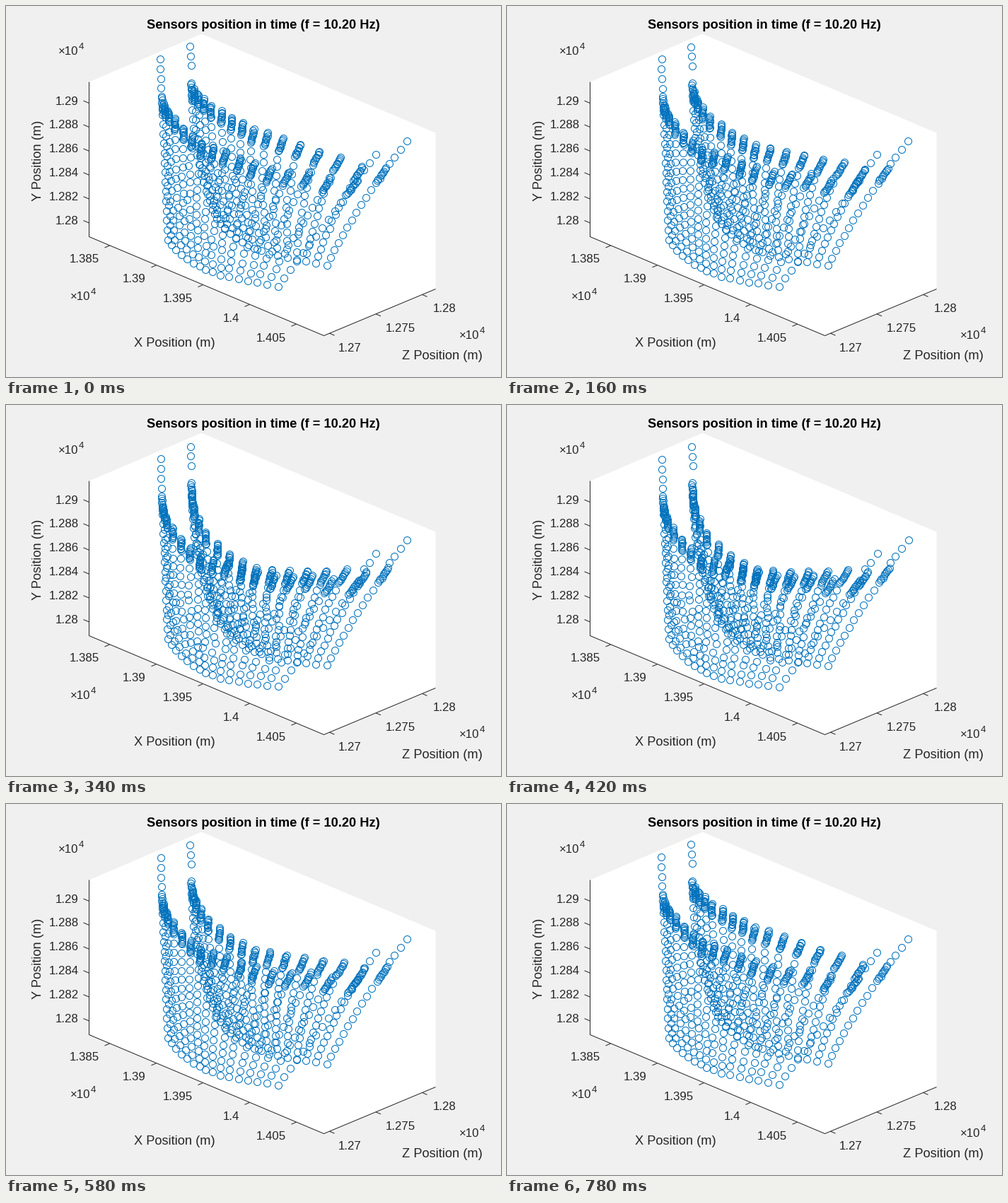
Animation of 700 by 525 pixels, one loop 0.8 s. Source, as a matplotlib script:

```python
import numpy as np
import matplotlib.pyplot as plt
from matplotlib.animation import FuncAnimation

W, H, DPI = 700, 525, 100
FRAMES, STEP = 40, 20
INK = "#262626"
BLUE = "#0072BD"
PX = 72 / DPI
TICK, LABEL = 16.7, 18.3

fig = plt.figure(figsize=(W / DPI, H / DPI), dpi=DPI, facecolor="#F0F0F0")
ax = fig.add_axes([0, 0, 1, 1])
ax.set_xlim(-0.5, W - 0.5)
ax.set_ylim(H - 0.5, -0.5)
ax.axis("off")


def write(x, y, text, size=TICK, ha="left", color=INK, **kw):
    """Text whose capitals are centred on y."""
    ax.text(x, y + 0.36 * size, text, fontsize=size * PX, ha=ha, va="baseline",
            color=color, family="Liberation Sans", **kw)


def line(*points):
    ax.plot(*zip(*points), color=INK, lw=PX, solid_capstyle="butt", zorder=2)


def power(x, y):
    write(x, y, "×10")
    write(x + 29, y - 6, "4", 13.3)


# Box, axes and labels
ax.fill(*zip((117, 107), (276, 39), (607, 179), (607, 400), (449, 466), (117, 326)),
        color="white", lw=0)
line((117, 107), (117, 326), (449, 466), (607, 400))

for k, name in enumerate(["1.29", "1.288", "1.286", "1.284", "1.282", "1.28"]):
    y = 137 + 33.9 * k
    line((117, y), (109, y - 3.4))
    write(102, y - 4, name, ha="right")
for k, name in enumerate(["1.385", "1.39", "1.395", "1.4", "1.405"]):
    x, y = 146 + 66 * k, 338.5 + 27.8 * k
    line((x, y), (x - 7, y + 3))
    write(131 + 66.2 * k, 356 + 28 * k, name, ha="right")
for k, name in enumerate(["1.27", "1.275", "1.28"]):
    x, y = 457 + 65.5 * k, 462.7 - 27.4 * k
    line((x, y), (x + 7, y + 3))
    write(469 + 67 * k, 482 - 28 * k, name)

power(73, 62)
power(90, 409)
power(640, 464)
write(363, 25, "Sensors position in time (f = 10.20 Hz)", LABEL, "center", "black",
      weight="bold")
write(238, 475, "X Position (m)", LABEL, "center")
write(616, 493, "Z Position (m)", LABEL, "center")
ax.text(50, 218, "Y Position (m)", fontsize=LABEL * PX, rotation=90, ha="center",
        va="baseline", rotation_mode="anchor", color=INK, family="Liberation Sans")

# Sensor sheets: rim clusters joined to the bottom edge by columns
COLS = 16
u = np.linspace(0, 1, COLS)
arch = np.sin(np.pi * u) ** 1.3
wave = np.sin(2 * np.pi * u)

bottom_x = np.array([228, 233, 239, 247, 255, 264, 273, 281,
                     291, 302, 314, 328, 341, 354, 368, 384])
bottom_y = np.array([330, 337, 344, 351, 357, 363, 367, 372,
                     375, 380, 382, 385, 388, 390, 393, 396])
front_x = np.array([220, 224, 229, 238, 250, 262, 275, 291,
                    308, 328, 347, 371, 395, 423, 452, 489])
front_y = np.array([140, 147, 155, 167, 180, 192, 203, 208,
                    214, 224, 231, 239, 243, 245, 253, 256])
back_x = np.array([262, 266, 271, 279, 289, 304, 318, 333,
                   348, 367, 388, 412, 438, 467, 497, 530])
back_y = np.array([121, 126, 132, 140, 149, 157, 166, 173,
                   183, 188, 196, 204, 214, 223, 237, 239])

half_y = 8 + 5 * np.exp(-2 * u * 15) + 2 * u
half_x = -0.8 + 8 * u ** 1.6

rng = np.random.default_rng(4)
home, shift, jumble = [], [], []


def add(pos, move, mess=0.0):
    home.append(pos)
    shift.append(move)
    jumble.append(rng.normal(0, 1, 2) * mess)


def sheet(rim_x, rim_y, low, bend, move):
    """Place one sheet at its first extreme; move is the travel to the other one."""
    for i in range(COLS):
        mx, my = move[0][i], move[1][i]
        for v in np.linspace(-1, 1, 10):
            wob = rng.uniform(-0.7, 0.7, 2)
            add((rim_x[i] - v * half_x[i] + wob[0], rim_y[i] + v * half_y[i] + wob[1]),
                (mx, my))
        count = 13 if i < 11 else 12 if i < 15 else 11
        x0, y0 = rim_x[i] - half_x[i], rim_y[i] + half_y[i]
        x1, y1 = bottom_x[i] + low[0], bottom_y[i] + low[1]
        low_move = 6 * np.sin(np.pi * u[i]) + 2 * u[i]
        for s in np.arange(1, count + 1) / count:
            belly = 4 * s * (1 - s)
            add((x0 + (x1 - x0) * s + bend[i] * belly, y0 + (y1 - y0) * s),
                (mx * (1 - s), my * (1 - s) + low_move * s),
                1.7 * belly * np.sin(np.pi * u[i]) ** 0.5)


def tail(points, move):
    for p in points:
        add(p, move)


sheet(front_x, front_y, (0, 0), -4 * np.sin(np.pi * u),
      (-4 * wave + 2 * u, 18 * np.sin(np.pi * u ** 0.8) ** 1.3 + 1.5))
sheet(back_x, back_y, (69, -30), -9 + 6 * u,
      (-8 * wave + 3 * u, 56 * arch + 1.5))
tail([(217.7, 74), (217.5, 88), (218, 102), (218.7, 115.5)], (1, 2))
tail([(259.3, 56.8), (260, 70), (261, 83.5)], (1, 2))
tail([(522.3, 209), (513, 221.5), (505, 231)], (0.7, 0.7))
tail([(566.3, 190), (557, 202), (548, 213), (541, 222)], (0.7, 0.7))

home, shift, jumble = map(np.array, (home, shift, jumble))
dots, = ax.plot([], [], "o", ms=10 * PX, mfc="none", mec=BLUE, mew=PX * 1.05, zorder=3)


def draw(n):
    c = np.cos(2 * np.pi * (n * STEP + 10) / (FRAMES * STEP))
    pos = home + shift * (1 - c) / 1.95 + jumble * (c - 0.1)
    dots.set_data(pos[:, 0], pos[:, 1])
    return dots,


anim = FuncAnimation(fig, draw, frames=FRAMES, interval=STEP, repeat=True,
                     repeat_delay=0, blit=False)
plt.show()
```
